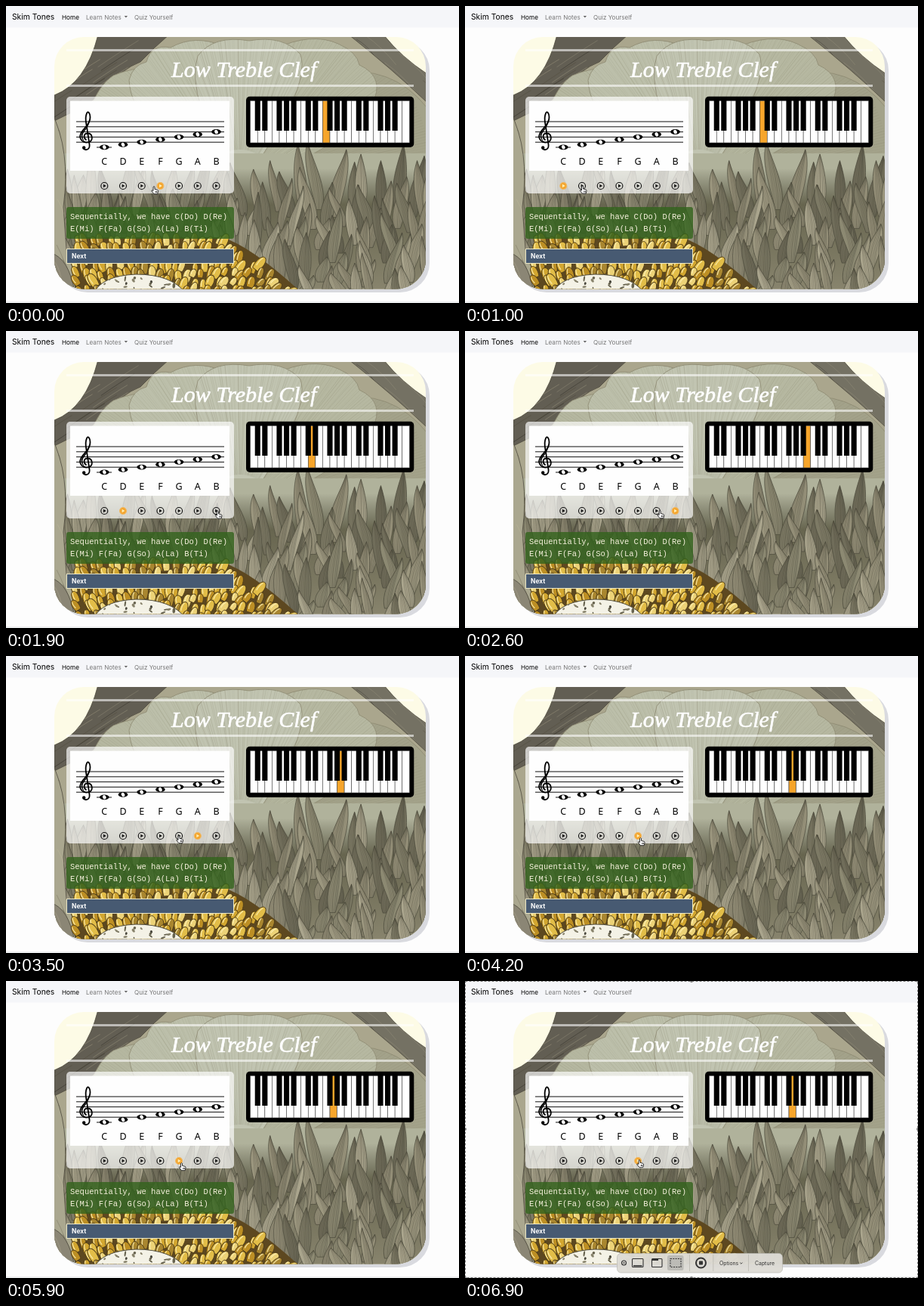
These frames come from a looping animation (600 px wide and 393 px high, 7000 ms). An HTML page with a canvas:

```html
<!DOCTYPE html>
<html lang="en">
<head>
<meta charset="utf-8">
<title>Low Treble Clef</title>
<style>
html, body { margin: 0; width: 100%; height: 100%; overflow: hidden; background: #fdfdfd; }
canvas, svg { position: absolute; left: 0; top: 0; width: 600px; height: 393px; display: block; }
text { font-family: Inter, sans-serif; }
.title { font: italic 30px "Liberation Serif", serif; fill: #fff; }
.mono { font: 10.5px "Liberation Mono", monospace; fill: #f6f1dc; }
.note { font: 12.5px "Noto Sans", sans-serif; text-anchor: middle; }
</style>
</head>
<body>
<canvas id="art" width="600" height="393"></canvas>
<svg id="ui" viewBox="0 0 600 393"></svg>
<script>
const LOOP = 7000, STEP = 100;
const ctx = document.getElementById('art').getContext('2d');
const ui = document.getElementById('ui');

let seed = 17;
const rnd = (a = 0, b = 1) => {
  seed = (seed * 16807) % 2147483647;
  return a + (b - a) * seed / 2147483647;
};
const pick = list => list[Math.floor(rnd(0, list.length))];

// ---------- illustrated card ----------
function shape(path, fill, stroke, width = 1) {
  const p = new Path2D(path);
  ctx.fillStyle = fill;
  ctx.fill(p);
  if (stroke) {
    ctx.strokeStyle = stroke;
    ctx.lineWidth = width;
    ctx.stroke(p);
  }
  return p;
}

function line(x1, y1, cx, cy, x2, y2) {
  ctx.beginPath();
  ctx.moveTo(x1, y1);
  ctx.quadraticCurveTo(cx, cy, x2, y2);
  ctx.stroke();
}

function inside(p, draw) {
  ctx.save();
  ctx.clip(p);
  draw();
  ctx.restore();
}

function petal(path, fill, cx, cy, from, to) {
  const p = shape(path, fill, '#8d8a72', 0.8);
  inside(p, () => {
    for (let i = 0; i < 75; i++) {
      const a = from + (to - from) * i / 75, r = rnd(100, 215);
      const c = Math.cos(a), s = Math.sin(a);
      ctx.lineWidth = rnd(0.3, 0.7);
      ctx.strokeStyle = `rgba(122,120,94,${rnd(0.12, 0.4)})`;
      line(cx + c * 45, cy + s * 45, cx + c * r + rnd(-4, 4), cy + s * r, cx + c * 255, cy + s * 255);
    }
  });
}

function rock(path, fill, dx, dy) {
  const p = shape(path, fill, '#4d493d', 0.8);
  inside(p, () => {
    for (let i = 0; i < 260; i++) {
      const x = rnd(50, 570), y = rnd(38, 375), k = rnd(0.5, 1.3);
      ctx.lineWidth = rnd(0.4, 1);
      ctx.strokeStyle = pick(['rgba(40,38,32,.5)', 'rgba(190,181,153,.45)', 'rgba(75,68,53,.5)']);
      line(x, y, x + dx * k / 2 + 3, y + dy * k / 2 - 3, x + dx * k, y + dy * k);
    }
  });
}

function leaf(x, y, h, w, lean) {
  const tx = x + lean, ty = y - h;
  const p = shape(
    `M${x - w * 0.35} ${y}C${x - w} ${y - h * 0.4} ${tx - w * 0.7} ${ty + h * 0.3} ${tx} ${ty}` +
    `C${tx + w * 0.6} ${ty + h * 0.3} ${x + w} ${y - h * 0.35} ${x + w * 0.35} ${y}Z`,
    pick(['#8c8972', '#9c977f', '#7d7a65', '#938e77', '#aaa58d', '#706d5a']), '#4b493b', 0.7);
  inside(p, () => {
    for (let i = -4; i <= 4; i++) {
      ctx.lineWidth = i ? 0.4 : 0.8;
      ctx.strokeStyle = i > 1 ? 'rgba(45,44,34,.6)' : 'rgba(62,60,46,.45)';
      line(x + i * w / 10, y, x + i * w / 5, y - h / 2, tx + i * 0.3, ty);
    }
  });
}

function kernel(x, y, r) {
  ctx.save();
  ctx.translate(x, y);
  ctx.rotate((x - 190) / 260 + rnd(-0.3, 0.3));
  const h = r * rnd(1.3, 2);
  shape(`M${-r * 0.6} ${h}C${-r * 1.4} ${-h} ${r * 1.4} ${-h} ${r * 0.6} ${h}Z`,
    pick(['#d2a62f', '#e2bd48', '#bd8f24', '#ecd277', '#a9862f']), '#4f3d18', 0.9);
  ctx.strokeStyle = 'rgba(255,243,184,.8)';
  ctx.lineWidth = 1.3;
  line(-r * 0.3, h * 0.6, -r * 0.5, 0, -r * 0.2, -h * 0.35);
  ctx.restore();
}

function drawArt() {
  ctx.fillStyle = '#d9dadf';
  ctx.beginPath();
  ctx.roundRect(69, 46, 492, 333, 39);
  ctx.fill();

  const card = new Path2D();
  card.roundRect(64, 41, 492, 333.5, 39);
  inside(card, () => {
    ctx.fillStyle = '#fdfbe6';
    ctx.fillRect(64, 41, 492, 334);

    shape('M64 150Q96 92 200 38H500Q525 70 558 90V380H64Z', '#aaa68d');
    rock('M122 38H216Q196 55 178 74Q152 84 138 106L105 132L64 152V118Q106 102 122 38Z', '#625e53', -46, 30);
    rock('M454 38H500Q524 68 558 90V128Q512 84 454 38Z', '#747163', 42, 40);
    petal('M84 240Q105 115 142 92Q198 68 256 100L310 230Z', '#b5b7a0', 310, 235, 3.3, 4.5);
    petal('M558 245V135Q510 75 435 90L310 230Z', '#a3a28a', 310, 235, 5.2, 6.3);
    petal('M310 240Q166 170 163 98Q168 78 186 74Q192 50 218 55Q250 37 288 53L335 180Z', '#bcbfaa', 310, 235, 3.6, 4.8);
    petal('M310 240L355 57Q405 34 440 50Q465 61 468 78Q503 94 485 130Q450 187 310 240Z', '#b6b8a1', 310, 235, 4.8, 6);
    petal('M310 240Q236 120 254 66Q275 38 322 46Q367 38 390 64Q405 110 310 240Z', '#c1c4b1', 310, 235, 4.1, 5.3);
    shape('M64 195H558V270H64Z', '#b0b29b');

    // foliage, back to front
    const shade = ctx.createLinearGradient(0, 215, 0, 375);
    shade.addColorStop(0, 'rgba(92,91,75,0)');
    shade.addColorStop(0.3, '#67654f');
    shade.addColorStop(1, '#88846d');
    ctx.fillStyle = shade;
    ctx.fillRect(64, 215, 492, 160);
    for (let row = 0; row < 6; row++) {
      for (let x = 56; x < 570; x += 20 - row * 0.7) {
        leaf(x + rnd(-6, 6), 272 + row * 24 + rnd(-5, 8), rnd(50, 90) - row * 5, rnd(8, 13), rnd(-20, 20));
      }
    }
    rock('M60 140Q86 190 76 266L80 322Q91 346 92 378H60Z', '#aaa78f', 16, 45);
    rock('M60 327Q83 334 91 378H60Z', '#8b8675', 18, 38);

    // corn bed and spotted cap
    shape('M92 306H286Q325 318 390 378H92Z', '#5d4820');
    for (let y = 308; y < 385; y += 11) {
      for (let x = 94; x < 296 + (y - 308) * 1.3; x += 11) {
        kernel(x + rnd(-4, 4), y + rnd(-3, 3), rnd(5, 7.5));
      }
    }
    const cap = shape('M116 380Q127 357 172 355Q219 355 238 380Z', '#f4f2e6', '#4e4a3b', 1);
    inside(cap, () => {
      for (let i = 0; i < 20; i++) {
        ctx.beginPath();
        ctx.ellipse(rnd(126, 232), rnd(358, 375), rnd(1, 3.6), rnd(0.8, 2), rnd(0, 3), 0, 7);
        ctx.fillStyle = pick(['#48463b', '#67634f', '#88836c']);
        ctx.fill();
      }
    });
  });
}

// ---------- interface ----------
const NS = 'http://www.w3.org/2000/svg';
function el(tag, attrs, parent = ui) {
  const node = document.createElementNS(NS, tag);
  for (const k in attrs) node.setAttribute(k, attrs[k]);
  return parent.appendChild(node);
}
const rect = (x, y, width, height, fill, more, parent) =>
  el('rect', { x, y, width, height, fill, ...more }, parent);
const path = (d, fill, more, parent) => el('path', { d, fill, ...more }, parent);
function label(str, x, y, attrs, parent) {
  el('text', { x, y, ...attrs }, parent).textContent = str;
}

function drawPage() {
  rect(0, 0, 600, 28.5, '#f5f6f9');
  label('Skim Tones', 8, 18, { 'font-size': 10.3 });
  label('Home', 74, 17.5, { 'font-size': 8.2 });
  label('Learn Notes', 106, 17.5, { 'font-size': 8.1, fill: '#777' });
  path('M156.7 13h4.4l-2.2 2.4z', '#666');
  label('Quiz Yourself', 170, 17.5, { 'font-size': 8.1, fill: '#777' });
  rect(0, 391.5, 600, 1, '#dedfe2');

  for (const y of [57, 104]) rect(80, y, 460, 3, '#fff', { opacity: 0.58 });
  label('Low Treble Clef', 219, 94, { class: 'title', stroke: '#fff', 'stroke-width': 0.6 });

  rect(80, 120, 222, 128, '#fff', { rx: 5, opacity: 0.68 });
  rect(85, 125.5, 211, 92.5, '#fefefe');
  rect(80, 266, 222, 42, '#32631c', { rx: 3, opacity: 0.8 });
  label('Sequentially, we have C(Do) D(Re)', 85, 282, { class: 'mono' });
  label('E(Mi) F(Fa) G(So) A(La) B(Ti)', 85, 298, { class: 'mono' });
  rect(80.5, 321.5, 221, 19, '#475a72', { stroke: '#e9e5c4' });
  label('Next', 87, 334, { 'font-size': 8.4, 'font-weight': 700, fill: '#fff' });
}

const NAMES = 'CDEFGAB';
const noteX = i => 130.3 + i * 24.7;
const icons = [];

function drawStaff() {
  for (let i = 0; i < 5; i++) rect(93, 152.5 + i * 6.8, 196, 1, '#111');
  path('M106 177C102 174 103 168.5 108 168.5C115 168.5 116 178 109.5 180.2C102 182 96 176 99 169' +
    'C101 163 112 157 111.5 147C111 141 108.5 138.5 107 142C104 148 106 154 107 160L110.5 183' +
    'C111.5 190 106 191.5 103 189', 'none', { stroke: '#000', 'stroke-width': 1.8, 'stroke-linecap': 'round' });
  path('M99.8 170C102 164 109 160 111 151C110 161 103 165 101.4 171Q101 176 105 180Q99 176 99.8 170', '#000');
  el('circle', { cx: 103.2, cy: 187.5, r: 2.2 });
  rect(120, 186.5, 20, 1, '#111');

  [...NAMES].forEach((name, i) => {
    const x = noteX(i), y = 186.8 - i * 3.38;
    el('ellipse', { cx: x, cy: y, rx: 6.3, ry: 3.4 });
    el('ellipse', { cx: x, cy: y, rx: 2.2, ry: 2.8, fill: '#fff', transform: `rotate(-25 ${x} ${y})` });
    label(name, x, 209.7, { class: 'note' });
    const g = el('g', { transform: `translate(${x} 238)` });
    icons.push({
      ring: el('circle', { r: 4.5, 'stroke-width': 1.15 }, g),
      tri: path('M-1.4 -2.3L2.4 0L-1.4 2.3Z', '#111', {}, g)
    });
  });
}

const KEY_X = 323.7, KEY_W = 210.6 / 22, keys = [];
function drawPiano() {
  rect(318, 119.7, 222.3, 67.3, '#000', { rx: 5 });
  rect(KEY_X, 125.5, 210.6, 55.5, '#fff');
  for (let i = 0; i < 22; i++) {
    keys.push(rect(KEY_X + i * KEY_W, 125.5, KEY_W, 55.5, '#fff', { stroke: '#444', 'stroke-width': 0.6 }));
  }
  for (let i = 0; i < 21; i++) {
    if (i % 7 === 2 || i % 7 === 6) continue;
    rect(KEY_X + (i + 1) * KEY_W - 3.55, 125, 7.1, 40, '#000');
  }
}

let cursor, recorder;
function drawRecorder() {
  recorder = el('g', {});
  rect(0.5, 0.5, 599, 392, 'none', { stroke: '#777', 'stroke-dasharray': '3 2' }, recorder);
  for (const x of [0, 300, 600]) for (const y of [0, 196, 393]) {
    if (x !== 300 || y !== 196) el('circle', { cx: x, cy: y, r: 2, fill: '#777' }, recorder);
  }
  rect(201.5, 360.5, 219, 25.5, '#dddbd5', { rx: 5, stroke: '#b9b8b2', 'stroke-width': 0.7, opacity: 0.97 }, recorder);
  const ink = { stroke: '#333', 'stroke-width': 1.1 };
  el('circle', { cx: 210.5, cy: 373, r: 3, fill: 'none', ...ink }, recorder);
  path('M209.3 371.8l2.4 2.4m0 -2.4l-2.4 2.4', 'none', { ...ink, 'stroke-width': 0.8 }, recorder);
  rect(268, 363, 21.5, 20, '#bcbbb6', { rx: 2.5 }, recorder);
  rect(221.5, 367.5, 14.5, 11, 'none', { rx: 1, ...ink }, recorder);
  rect(223, 376, 11.5, 1.5, '#333', {}, recorder);
  rect(247.5, 367.5, 13.5, 11, 'none', { rx: 1, ...ink }, recorder);
  rect(248, 367.5, 8, 2.5, '#333', {}, recorder);
  rect(272, 367.5, 14, 11, 'none', { ...ink, 'stroke-dasharray': '2 1.3' }, recorder);
  for (const x of [297, 328.5, 375]) rect(x, 362, 0.7, 22, '#b7b5ae', {}, recorder);
  el('circle', { cx: 312.5, cy: 373, r: 6.5, fill: 'none', stroke: '#333', 'stroke-width': 2 }, recorder);
  rect(310, 370.5, 5, 5, '#333', { rx: 0.7 }, recorder);
  label('Options', 337, 375.7, { 'font-size': 6.9, fill: '#333' }, recorder);
  path('M364.2 372.6l1.6 1.6l1.6 -1.6', 'none', { ...ink, 'stroke-width': 0.9 }, recorder);
  label('Capture', 384, 375.7, { 'font-size': 6.9, fill: '#333' }, recorder);
}

function drawCursor() {
  cursor = path('M-2 -3.6Q-1 -5 0 -3.6V-.6L3.6 .4Q4.8 .8 4.5 2.2L3.7 5.7H-1L-4.2 1.8Q-4.4 .2 -2.5 1.2L-2 1.6Z' +
    'M1.3 2V4.1M2.8 2V4.1', '#fff', { stroke: '#111', 'stroke-width': 0.85, 'stroke-linejoin': 'round' });
}

// ---------- timing ----------
const PLAYED = [[0, 3], [500, 0], [1100, 1], [2000, 6], [2800, 5], [3600, 4]];
const MOVES = [
  [0, 197, 243], [400, 131, 242], [700, 131, 242], [1000, 156.5, 242.5], [1300, 156.5, 242.5],
  [1800, 281.5, 242.5], [2300, 281.5, 242.5], [2700, 255, 242], [3000, 255, 242], [3400, 230, 242],
  [3700, 230, 242], [4100, 233.5, 245], [6300, 233.5, 245], [6700, 232, 241], [7000, 232, 241]
];

function pointer(t) {
  const i = MOVES.findIndex(m => m[0] > t);
  const [a, x, y] = MOVES[i - 1], [b, x2, y2] = MOVES[i];
  const k = (t - a) / (b - a), e = k * k * (3 - 2 * k);
  return [x + (x2 - x) * e, y + (y2 - y) * e];
}

function render(t) {
  const active = PLAYED.filter(p => p[0] <= t).pop()[1];
  icons.forEach(({ ring, tri }, i) => {
    const on = i === active;
    ring.setAttribute('fill', on ? '#f4a630' : 'none');
    ring.setAttribute('stroke', on ? '#eeb968' : '#111');
    tri.setAttribute('fill', on ? '#fff0b5' : '#111');
  });
  keys.forEach((key, i) => key.setAttribute('fill', i === active + 7 ? '#f6a52b' : '#fff'));
  cursor.setAttribute('transform', `translate(${pointer(t)})`);
  recorder.style.display = t >= 6700 ? '' : 'none';
}

drawArt();
drawPage();
drawStaff();
drawPiano();
drawRecorder();
drawCursor();

const start = performance.now();
function frame() {
  const t = (performance.now() - start) % LOOP;
  render(Math.floor(t / STEP) * STEP);
  requestAnimationFrame(frame);
}
frame();
</script>
</body>
</html>
```
